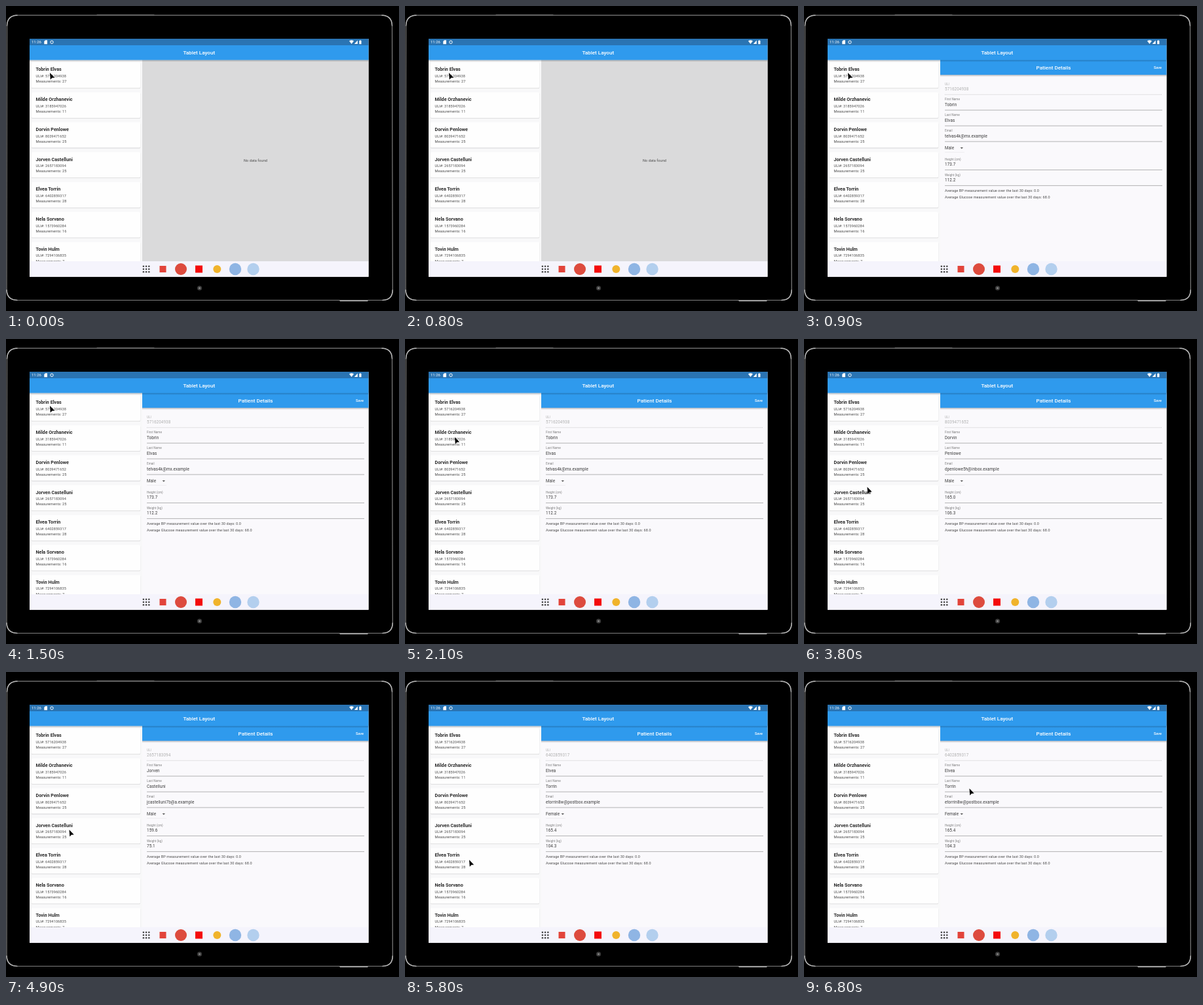
Animation, 600 px wide and 466 px high, one loop 6900 ms. Source, as an HTML page:

```html
<!DOCTYPE html>
<html lang="en">
<head>
<meta charset="utf-8">
<title>Tablet Layout</title>
<style>
  html, body { margin: 0; width: 100%; height: 100%; overflow: hidden; background: #000; }
  svg { display: block; width: 600px; height: 466px; font-family: Roboto, "Liberation Sans", sans-serif; }
  .title { font-size: 8.1px; font-weight: 500; fill: #fff; text-anchor: middle; }
  .name { font-size: 7.2px; font-weight: 600; fill: #2b2b2b; }
  .small { font-size: 5.5px; letter-spacing: .08px; fill: #4a4a4a; }
  .label { font-size: 4.7px; fill: #7d7d7d; }
  .value { font-size: 6.3px; letter-spacing: .1px; fill: #3a3a3a; }
  .off { fill: #b0b0b0; }
  .mid { text-anchor: middle; }
</style>
</head>
<body>
<svg viewBox="0 0 600 466">
  <defs>
    <linearGradient id="shade" x2="0" y2="1">
      <stop stop-color="#000" stop-opacity=".25"/>
      <stop offset="1" stop-color="#000" stop-opacity="0"/>
    </linearGradient>
    <clipPath id="view"><rect x="36" y="82" width="517.500" height="308"/></clipPath>
  </defs>

  <!-- tablet body -->
  <rect width="600" height="466"/>
  <g fill="none" stroke-linecap="round">
    <path d="M17 14.200 H574 Q589 14.500 589.500 30 L590.300 434 Q590 449 575 449.500 H17 Q1.500 449 1 434 L1.500 30 Q2 14.500 17 14.200Z" stroke="#808080" stroke-width="1.200"/>
    <path d="M1.500 30 Q2 14.500 17 14.200 M574 14.200 Q589 14.500 589.500 30 M590.300 434 Q590 449 575 449.500 M17 449.500 Q1.500 449 1 434" stroke="#b4b4b4" stroke-width="1.500"/>
    <path d="M139 13.300 H226" stroke="#777" stroke-width=".8"/>
    <path d="M510 450.500 H552" stroke="#aaa" stroke-width="1.400"/>
  </g>
  <circle cx="295.500" cy="431" r="3.600" fill="#3c3c3c"/>
  <circle cx="295.500" cy="431" r="1.500" fill="#858585"/>

  <!-- screen -->
  <rect x="36" y="50" width="517.500" height="363.700" fill="#f8f8f9"/>
  <g clip-path="url(#view)">
    <g id="list"></g>
    <g id="empty">
      <rect x="208" y="82" width="346" height="308" fill="#dadadb"/>
      <text class="small mid" x="381" y="238.200">No data found</text>
    </g>
    <g id="detail">
      <rect x="208" y="82" width="346" height="308" fill="#faf9fc"/>
      <rect x="208" y="82" width="346" height="23.200" fill="#2f9aed"/>
      <rect x="208" y="105.200" width="346" height="3" fill="url(#shade)"/>
      <text class="title" x="381" y="97">Patient Details</text>
      <text x="534" y="96" font-size="5.500" font-weight="500" fill="#fff">Save</text>
      <g id="form"></g>
    </g>
    <rect x="36" y="82.500" width="518" height="3" fill="url(#shade)"/>
  </g>

  <rect x="36" y="50" width="517.500" height="10.500" fill="#2a74b3"/>
  <rect x="36" y="60" width="517.500" height="22.500" fill="#2f9aed"/>
  <text class="title" x="294.800" y="74.200">Tablet Layout</text>
  <g fill="#fff">
    <text x="39" y="57.400" font-size="6">11:26</text>
    <path d="M60 52.300 H63 V58.300 H58.300 V54Z"/>
    <circle cx="70" cy="55.200" r="2.200" fill="none" stroke="#fff"/>
    <path d="M524 53.600 Q527.500 51 531 53.600 L527.500 58Z"/>
    <path d="M536.800 52.500 V58 H531.800Z"/>
    <path d="M539.300 53 H540.200 V52.300 H541.600 V53 H542.500 V58.200 H539.300Z"/>
  </g>

  <rect x="36" y="390" width="517.500" height="23.700" fill="#f5f4fc"/>
  <g id="dots" fill="#444"></g>
  <rect x="234.500" y="397" width="10" height="10" fill="#e2443a"/>
  <circle cx="267" cy="402" r="9" fill="#dd4b3e"/>
  <rect x="289" y="396.500" width="11" height="11" fill="#f40b0b"/>
  <circle cx="322.300" cy="402" r="6" fill="#f0b32b"/>
  <circle cx="350" cy="402" r="9.200" fill="#8fb5e4"/>
  <circle cx="377.500" cy="402" r="9.200" fill="#b3cfee"/>

  <path id="cursor" d="M0 0 L.8 10.500 L3.300 7.800 L7.200 7.400Z"/>
</svg>
<script>
const LOOP = 6900, STEP = 100, PITCH = 45.7;
const $ = id => document.getElementById(id);

const people = [
  { first: "Tobrin", last: "Elvas", uli: "5716204938", count: 27, email: "telvas4k@mx.example", sex: "Male", height: "173.7", weight: "112.2" },
  { first: "Milde", last: "Orzhanevic", uli: "3185947026", count: 11, email: "morzhanevic3p@web.example", sex: "Female", height: "162.4", weight: "71.8" },
  { first: "Dorvin", last: "Penlowe", uli: "8039471652", count: 25, email: "dpenlowe5h@inbox.example", sex: "Male", height: "165.0", weight: "106.3" },
  { first: "Jorven", last: "Castelluni", uli: "2657183094", count: 25, email: "jcastelluni7b@a.example", sex: "Male", height: "159.6", weight: "75.1" },
  { first: "Elvea", last: "Torrin", uli: "6402859317", count: 28, email: "etorrin8w@postbox.example", sex: "Female", height: "165.4", weight: "104.3" },
  { first: "Nela", last: "Sorvano", uli: "1573960284", count: 16 },
  { first: "Tovin", last: "Hulm", uli: "7294106835", count: 7 }
];

const text = (cls, x, y, s) => `<text class="${cls}" x="${x}" y="${y}">${s}</text>`;
const line = (y, x2 = 547, more = "") =>
  `<path d="M215 ${y} H${x2}" stroke="#949494" stroke-width=".7" ${more}/>`;

$("list").innerHTML = people.map((p, i) => {
  const y = i * PITCH;
  return `<rect x="39" y="${87 + y}" width="166.200" height="39" rx="1.500" fill="#d6d6d7"/>
    <rect x="39" y="${86.2 + y}" width="166" height="39" rx="1.500" fill="#fefefe"/>` +
    text("name", 45.5, 99.4 + y, `${p.first} ${p.last}`) +
    text("small", 45.5, 109.1 + y, `ULI#: ${p.uli}`) +
    text("small", 45.5, 117.3 + y, `Measurements: ${p.count}`);
}).join("");

let dots = "";
for (let i = 0; i < 9; i++)
  dots += `<circle cx="${209.9 + i % 3 * 4.2}" cy="${397.8 + Math.floor(i / 3) * 4.2}" r="1.3"/>`;
$("dots").innerHTML = dots;

function field(y, label, value) {
  return text("label", 215, y, label) + text("value", 215, y + 8.6, value) + line(y + 14.9);
}

function form(p) {
  return text("label off", 215, 120.5, "ULI") + text("value off", 215, 129.2, p.uli) +
    line(135.3, 547, 'stroke-dasharray=".7 1.3"') +
    field(144.2, "First Name", p.first) +
    field(168.2, "Last Name", p.last) +
    field(192.2, "Email", p.email) +
    text("value", 215, 219.3, p.sex) +
    '<path d="M238.600 216 H243 L240.800 218.300Z" fill="#555"/>' +
    line(223.5, 245, 'opacity=".15"') +
    field(235.5, "Height (cm)", p.height) +
    field(259.5, "Weight (kg)", p.weight) +
    text("small", 215, 283.8, "Average BP measurement value over the last 30 days: 0.0") +
    text("small", 215, 294.2, "Average Glucose measurement value over the last 30 days: 68.0");
}

// [time, person]
const picks = [[900, 0], [2300, 1], [3300, 2], [4400, 3], [5500, 4]];
// [time, x, y] of the pointer tip
const path = [
  [0, 67, 102], [1500, 67, 102], [2000, 76, 150], [2500, 76, 150],
  [3000, 94, 195], [3500, 94, 197], [3800, 96.5, 226], [4100, 96.5, 241],
  [4900, 96.5, 241], [5300, 98, 287], [5900, 98, 287], [6600, 252.5, 178], [6900, 252.5, 178]
];

function pointer(t) {
  const i = path.findIndex(k => k[0] > t);
  const [t0, x0, y0] = path[i - 1], [t1, x1, y1] = path[i];
  const u = (t - t0) / (t1 - t0), e = u * u * (3 - 2 * u);
  return [x0 + (x1 - x0) * e, y0 + (y1 - y0) * e];
}

let shown;
function draw(t) {
  const pick = picks.filter(k => k[0] <= t).pop();
  const who = pick ? pick[1] : -1;
  if (who !== shown) {
    shown = who;
    $("empty").style.display = who < 0 ? "" : "none";
    $("detail").style.display = who < 0 ? "none" : "";
    if (who >= 0) $("form").innerHTML = form(people[who]);
  }
  $("cursor").setAttribute("transform", `translate(${pointer(t)})`);
}

const start = performance.now();
function tick() {
  const t = (performance.now() - start) % LOOP;
  draw(Math.floor(t / STEP) * STEP);
  requestAnimationFrame(tick);
}
tick();
</script>
</body>
</html>
```
